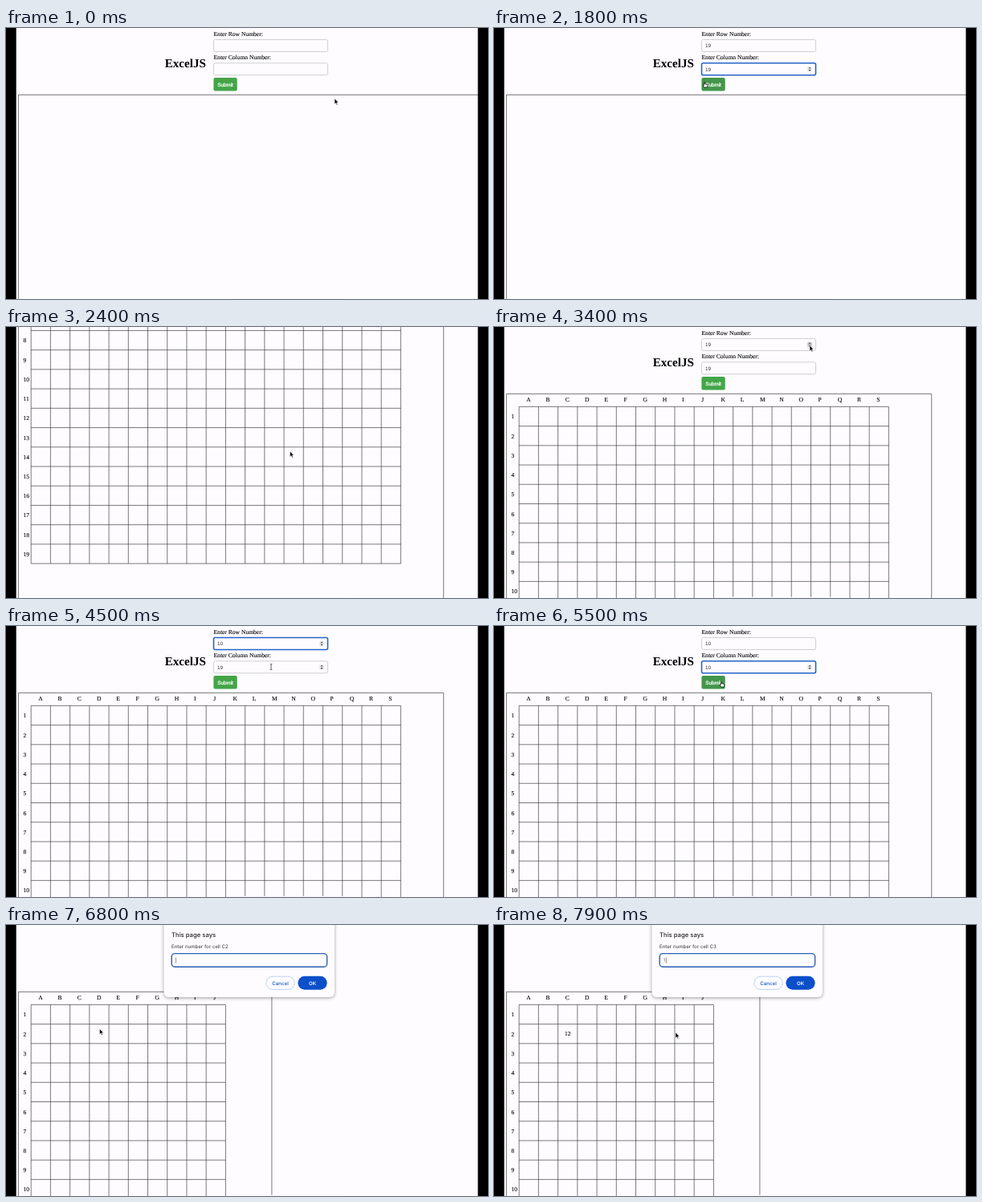
These frames come from a looping animation (600 px wide and 338 px high, 8 s). An HTML page:

```html
<!DOCTYPE html>
<html lang="en">
<head>
<meta charset="utf-8">
<title>ExcelJS</title>
<style>
  html, body { margin: 0; width: 100%; height: 100%; overflow: hidden; background: #fefcff; }
  svg { display: block; width: 600px; height: 338px; }
  text { text-rendering: geometricPrecision; white-space: pre; }
  .serif { font: 7.57px "Liberation Serif", "Times New Roman", serif; fill: #000; stroke: #000; stroke-width: .1; }
  .title { font: bold 15.1px "Liberation Serif", "Times New Roman", serif; fill: #000; }
  .field { font: 6.3px "Liberation Sans", Arial, sans-serif; fill: #333; }
  .submit { fill: #fff; stroke: #fff; stroke-width: .25; }
  .ui { font: 6.15px Inter, Roboto, sans-serif; fill: #333; }
  .line { fill: none; stroke: #333; stroke-width: .65; }
  #dialog { filter: drop-shadow(0 1px 2px rgba(0, 0, 0, .38)); }
</style>
</head>
<body>
<svg id="stage" viewBox="0 0 600 338"></svg>
<script>
const LOOP = 8000, STEP = 100, KEY = 100;
const PITCH = 24.22, LEFT = 31.2, TOP = 99.4;
const ROW_Y = 14.5, COL_Y = 43.8;
const PAPER = '#fefcff';
const stage = document.getElementById('stage');

function set(node, attrs) {
  for (const key in attrs) node.setAttribute(key, attrs[key]);
  return node;
}
function add(parent, tag, attrs, text = '') {
  const node = set(document.createElementNS('http://www.w3.org/2000/svg', tag), attrs);
  node.textContent = text;
  parent.append(node);
  return node;
}
const label = (parent, cls, x, y, text, more) =>
  add(parent, 'text', { class: cls, x, y, ...more }, text);
const box = (parent, x, y, width, height, rx, more) =>
  add(parent, 'rect', { x, y, width, height, rx, ...more });
const show = (node, on) => node.setAttribute('visibility', on ? 'visible' : 'hidden');

// Page
box(stage, 0, 0, 600, 338, 0, { fill: PAPER });
const page = add(stage, 'g');
label(page, 'title', 197.7, 48.5, 'ExcelJS');
label(page, 'serif', 258.5, 9.8, 'Enter Row Number:');
label(page, 'serif', 258.5, 39.3, 'Enter Column Number:');

function makeField(y) {
  const frame = box(page, 258.5, y, 142, 15, 2, { fill: PAPER });
  const value = label(page, 'field', 263, y + 9.7);
  const spin = add(page, 'g');
  const back = box(spin, 389.8, y + 4, 6.4, 7, 1.5);
  add(spin, 'path', {
    d: `M391.4 ${y + 6.7}l1.6-1.8l1.6 1.8zM391.4 ${y + 8.3}l1.6 1.8l1.6-1.8z`, fill: '#444'
  });
  return (text, focus, hover, onSpin) => {
    value.textContent = text;
    set(frame, { stroke: focus ? '#2565c7' : '#cbcbcd', 'stroke-width': focus ? 1.6 : 0.9 });
    show(spin, focus || hover);
    set(back, { fill: hover && onSpin ? '#d2d2d4' : '#ececee' });
  };
}
const drawRow = makeField(ROW_Y), drawCol = makeField(COL_Y);

const submit = box(page, 258.4, 62, 29.3, 16.5, 2);
label(page, 'field submit', 263.2, 72.5, 'Submit');

// Spreadsheets
function makeGrid(n, edge) {
  const g = add(page, 'g');
  const size = n * PITCH;
  let d = `M15.4 900V83.4H${edge}V900`;
  for (let i = 0; n && i <= n; i++) {
    d += `M${LEFT + i * PITCH} ${TOP}v${size}M${LEFT} ${TOP + i * PITCH}h${size}`;
  }
  add(g, 'path', { class: 'line', d });
  for (let i = 0; i < n; i++) {
    label(g, 'serif', 40.3 + i * PITCH, 92.7, String.fromCharCode(65 + i));
    label(g, 'serif', 21.4, 114.4 + i * PITCH, i + 1);
  }
  return g;
}
const grids = [makeGrid(0, 620), makeGrid(19, 544.7), makeGrid(10, 330.9)];
const cellValue = label(page, 'serif', 91.7, 138.3, '12', { 'text-anchor': 'middle' });

// Faint strip at the foot and side bars
box(stage, 280, 336.8, 142, 3, 1, { fill: '#f9f7fa' });
box(stage, 0, 0, 12.7, 338, 0);
box(stage, 587.4, 0, 12.6, 338, 0);

// Prompt
const dialog = add(stage, 'g', { id: 'dialog' });
box(dialog, 196.5, -10, 212.5, 100, 6, { fill: PAPER });
label(dialog, 'ui', 206, 15.3, 'This page says', { style: 'font-size:7.7px;font-weight:500;fill:#222' });
const question = label(dialog, 'ui', 206, 29.2);
box(dialog, 206.2, 35.6, 193.4, 16.6, 4, { fill: PAPER, stroke: '#2a5db5', 'stroke-width': 1.4 });
const answer = label(dialog, 'ui', 211, 46.2, '', { style: 'fill:#777' });
const caret = box(dialog, 0, 40.5, 0.6, 7, 0, { fill: '#555' });
box(dialog, 323.9, 64.2, 35.2, 16.2, 8.1, { fill: PAPER, stroke: '#b5cdf3', 'stroke-width': 0.9 });
label(dialog, 'ui', 341.5, 74.6, 'Cancel', { 'text-anchor': 'middle', style: 'fill:#0b57d0;font-weight:500' });
box(dialog, 363.4, 63.8, 36.2, 17, 8.5, { fill: '#0b4fc9' });
label(dialog, 'ui', 381.5, 74.6, 'OK', { 'text-anchor': 'middle', style: 'fill:#fff;font-weight:600' });

// Pointers, each with its hot spot at 0,0
const pointers = {
  arrow: add(stage, 'path', {
    d: 'M0 0V7L1.6 5.5L2.7 8.1L3.8 7.6L2.7 5.1H4.8Z', fill: '#000', stroke: '#fff', 'stroke-width': 0.5
  }),
  hand: add(stage, 'path', {
    d: 'M-.7 .2Q0-.6 .6 .2V2.3L3.2 2.8Q4 3 3.8 4L3.2 6.6H-.3L-2.2 3.9Q-2.2 3-.7 4Z',
    fill: '#fff', stroke: '#111', 'stroke-width': 0.8
  }),
  beam: add(stage, 'path', {
    d: 'M-1.3-3.6Q0-3.6 0-2.8Q0-3.6 1.3-3.6M0-2.8V2.8M-1.3 3.6Q0 3.6 0 2.8Q0 3.6 1.3 3.6',
    fill: 'none', stroke: '#222', 'stroke-width': 0.7
  })
};

// Pointer moves: from, until, x, y
const moves = [
  [0, 600, 310, 22], [1000, 1200, 310, 51], [1400, 1700, 262, 67.5],
  [1900, 2400, 353.5, 155], [2800, 3400, 393, 23], [4000, 4500, 330, 51],
  [5000, 5300, 283, 69.5], [5600, 6000, 294, 194.5], [6000, 6600, 86, 136],
  [6700, 7200, 380, 73], [7200, 7600, 90, 157], [7700, 7900, 226, 134]
];
// When typing starts, and the text
const rowKeys = [[900, '19'], [3900, '10']];
const colKeys = [[1400, '19'], [4900, '10']];
const answerKeys = [[6900, '12'], [7300, ''], [7900, '12']];
// What is in force from a time on
const focuses = [[700, 'row'], [1300, 'col'], [1900, ''], [3600, 'row'], [4600, 'col'], [5600, '']];
const prompts = [[6700, 'C2'], [7300, ''], [7700, 'C3']];

const latest = (list, t) => list.filter(([at]) => at <= t).pop() || [0, ''];
function typed(list, t) {
  const [at, text] = latest(list, t);
  return text.slice(0, 1 + Math.floor((t - at) / KEY));
}
function ease(t, from, until) {
  const p = Math.min(1, Math.max(0, (t - from) / (until - from)));
  return p * p * (3 - 2 * p);
}
const pointerAt = t => moves.reduce(([x, y], [from, until, toX, toY]) => {
  const p = ease(t, from, until);
  return [x + (toX - x) * p, y + (toY - y) * p];
}, [409, 88]);
const scrollAt = t =>
  264.5 * (ease(t, 2000, 2400) - ease(t, 2500, 2700)) +
  50.7 * (ease(t, 5800, 6000) - ease(t, 6000, 6300));

function draw(t) {
  const [x, y] = pointerAt(t);
  const offset = scrollAt(t);
  const focus = latest(focuses, t)[1];
  const ask = latest(prompts, t)[1];
  const over = (top, width, height) =>
    !ask && x >= 258 && x <= 258 + width && y + offset >= top && y + offset <= top + height;
  const overRow = over(ROW_Y, 143, 15), overCol = over(COL_Y, 143, 15);
  const overSubmit = over(62, 30, 17), onSpin = x > 389;

  set(page, { transform: `translate(0 ${-offset})` });
  drawRow(typed(rowKeys, t), focus === 'row', overRow, onSpin);
  drawCol(typed(colKeys, t), focus === 'col', overCol, onSpin);
  set(submit, { fill: overSubmit ? '#43964a' : '#43a548' });
  const submits = (t >= 1900) + (t >= 5600);
  grids.forEach((grid, i) => show(grid, i === submits));
  show(cellValue, t >= 7300);

  const reply = typed(answerKeys, t);
  show(dialog, ask);
  question.textContent = `Enter number for cell ${ask}`;
  answer.textContent = reply;
  set(caret, { x: 211.3 + reply.length * 3.1 });

  const kind = overSubmit ? 'hand' : (overRow || overCol) && !onSpin ? 'beam' : 'arrow';
  for (const name in pointers) show(pointers[name], name === kind);
  set(pointers[kind], { transform: `translate(${x} ${y})` });
}

const start = performance.now();
function tick() {
  const t = (performance.now() - start) % LOOP;
  draw(Math.floor(t / STEP) * STEP);
  requestAnimationFrame(tick);
}
tick();
</script>
</body>
</html>
```
